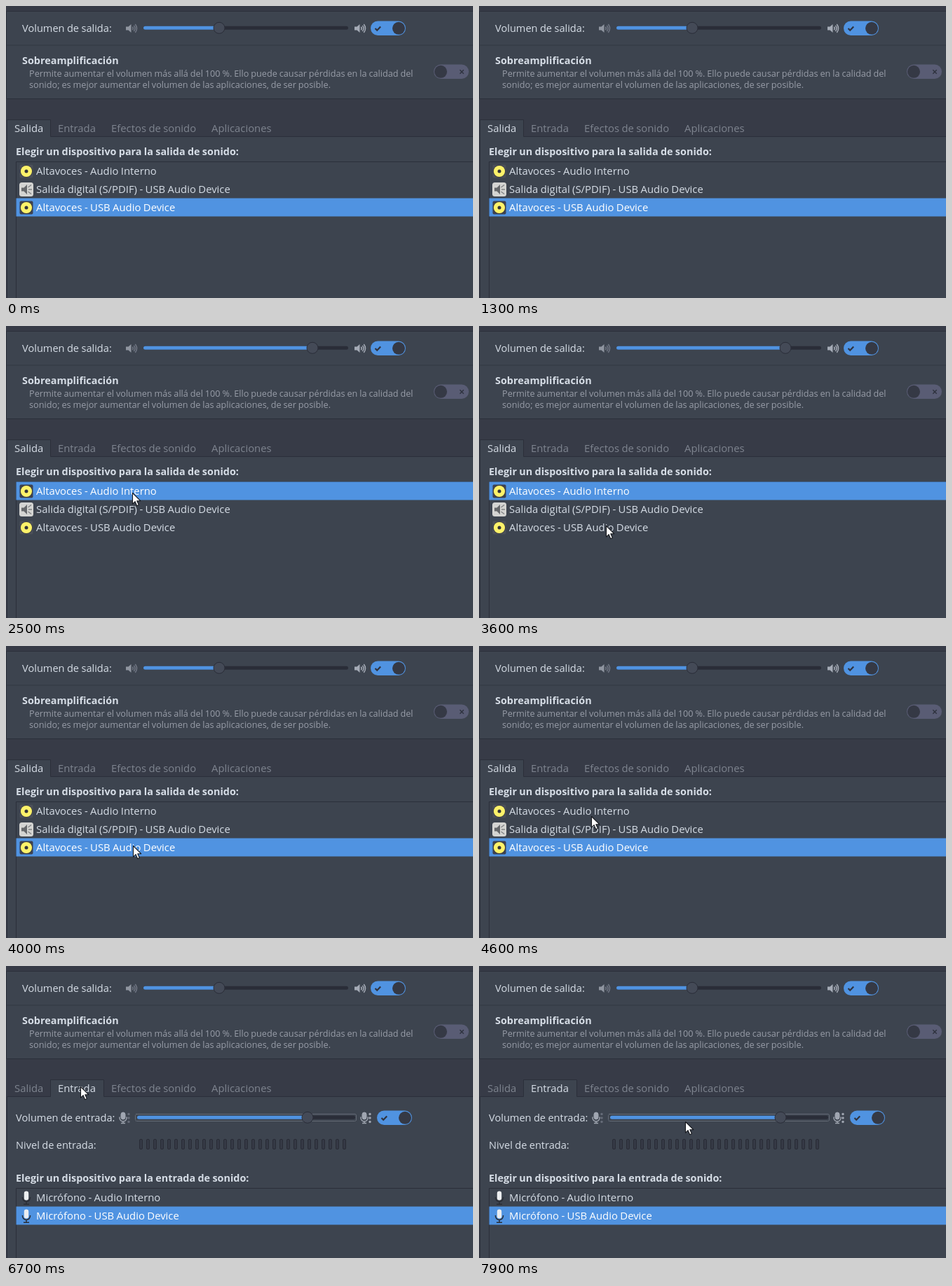
An HTML page for the animation above (8 s loop, 666 by 417 pixels).

```html
<!DOCTYPE html>
<html lang="es">
<head>
<meta charset="utf-8">
<title>Sonido</title>
<style>
  html, body { margin: 0; width: 100%; height: 100%; overflow: hidden; background: #373b47; }
  svg { display: block; width: 666px; height: 417px; }
  text { font: 14.85px "Open Sans", "Noto Sans", sans-serif; word-spacing: -.03em; fill: #d6dde6; white-space: pre; }
  .label { font-size: 14.6px; }
  .head { font-size: 14.4px; font-weight: 700; }
  .note { font-size: 12.7px; fill: #989da8; }
  .tab { fill: #7e848f; }
  .tab.hover { fill: #abb2bd; }
  .tab.on { fill: #d6dde6; }
  .row.on text { fill: #fff; }
  .row .bar { fill: none; }
  .row.on .bar { fill: #5093e1; }
  .row .plate { fill: #4b4f59; }
  .row.on .plate { fill: #3d4250; }
  .panel { fill: #3d444f; }
  .edge { fill: none; stroke: #2b2f3a; }
</style>
</head>
<body>
<svg id="stage" viewBox="0 0 666 417" xmlns="http://www.w3.org/2000/svg">
  <defs>
    <path id="cone" d="M0 5.5h3.5L7.5 2v12L3.5 10.5H0z" />
    <g id="waves" fill="none" stroke-width="1.5">
      <path d="M9.4 5.8q1.8 2.2 0 4.4" />
      <path d="M11.4 3.9q3.2 4.1 0 8.2" />
      <path d="M13.3 2q4.5 6 0 12" />
    </g>
    <g id="mic">
      <rect x="3" y="0" width="6" height="10" rx="3" />
      <path d="M1 6.5v1.5a5 5 0 0 0 10 0V6.5M6 13v2.5M3 15.5h6" fill="none" stroke-width="1.4" />
    </g>
    <g id="dots"><circle cx="14" cy="2.5" r="1.7" /><circle cx="14" cy="8" r="1.7" /><circle cx="14" cy="13.5" r="1.7" /></g>
  </defs>
  <path class="panel" d="M0 7h666v126H0z" />
  <path class="edge" d="M666 7.5H.5V132.5H666" />
  <path class="edge" d="M1 56H666" opacity=".6" />
  <path class="panel" d="M1 186h665v231H1z" />
  <g id="top"></g>
  <g id="tabs"></g>
  <g id="output"></g>
  <g id="input"></g>
  <path id="cursor" d="M.5 .5v15.6l3.6-3.4 2.6 6 2.7-1.2-2.6-5.8h4.9z"
        fill="#fff" stroke="#15171c" stroke-width="1.1" stroke-linejoin="round" />
</svg>
<script>
const LOOP = 8000;
const byId = id => document.getElementById(id);

const label = (x, y, str, cls = "") => `<text x="${x}" y="${y}" class="${cls}">${str}</text>`;

const slider = (id, x0, x1, y, value) => `
  <rect x="${x0}" y="${y - 2.5}" width="${x1 - x0}" height="5" rx="2.5" fill="#2a2d38"/>
  <rect id="${id}Fill" x="${x0}" y="${y - 2.5}" width="${value - x0}" height="5" rx="2.5" fill="#5093e1"/>
  <circle id="${id}Knob" cx="${value}" cy="${y}" r="8" fill="#444a57" stroke="#2a2d38"/>`;

const toggle = (x, y, on) => `
  <g transform="translate(${x} ${y})">
    <rect y="-.5" width="50" height="20.5" rx="10.2" fill="${on ? "#5093e1" : "#595c74"}"/>
    <circle cx="${on ? 40 : 10}" cy="9.8" r="9" fill="#353945"/>
    <path d="${on ? "M6.5 10l2.7 2.7 5-5.2" : "M37.3 7.3l5.4 5.4m0-5.4l-5.4 5.4"}" fill="none"
      stroke="#2f333f" stroke-width="${on ? 2.2 : 1.5}"/>
  </g>`;

const volumeIcon = (x, y, cone, waves) => `
  <g transform="translate(${x} ${y})"><use href="#cone" fill="${cone}"/><use href="#waves" stroke="${waves}"/></g>`;

const micIcon = (x, y, dots) => `
  <g transform="translate(${x} ${y})"><use href="#mic" fill="#a0a6b1" stroke="#a0a6b1"/><use href="#dots" fill="${dots}"/></g>`;

const deviceIcon = {
  speaker: y => `<rect class="plate" x="19.5" y="${y - 9.5}" width="19" height="19" rx="2"/>
    <circle cx="29" cy="${y}" r="9" fill="#3a3b40"/>
    <circle cx="29" cy="${y}" r="8.1" fill="#fdf26a"/>
    <circle cx="29" cy="${y}" r="2.5" fill="#34353b"/>`,
  digital: y => `<rect x="19" y="${y - 10}" width="20" height="20" rx="3.5" fill="#d4d4d2"/>
    <path d="M22 ${y - 2.5}h3.5l4.5-4.5v14l-4.5-4.5h-3.5z" fill="#66686b"/>
    <path d="M31.5 ${y - 3}l4.5-3.5M32 ${y}h5M31.5 ${y + 3}l4.5 3.5" stroke="#808284" stroke-width="1.3"/>`,
  mic: y => `<path d="M23.5 ${y - 1}v1a5.5 5.5 0 0 0 11 0v-1M29 ${y + 6}v3M25 ${y + 9.3}h8"
      fill="none" stroke="#2b2e35" stroke-width="1.5"/>
    <rect x="25.8" y="${y - 9.5}" width="6.4" height="13" rx="3.2" fill="#eceef0"/>`
};

const row = (top, icon, name) => `
  <g class="row"><rect class="bar" x="14.5" y="${top - .5}" width="652" height="26"/>
  ${deviceIcon[icon](top + 13)}${label(43, top + 18, name)}</g>`;

const listEdge = top => `<path class="edge" d="M666 ${top - .5}H14.5V417"/>`;

byId("top").innerHTML =
  label(23, 37, "Volumen de salida:", "label") +
  volumeIcon(171, 24, "#8f95a0", "#717784") + slider("out", 196, 488, 31.3, 304) +
  volumeIcon(497, 24, "#a5abb6", "#a5abb6") + toggle(520, 22, true) +
  label(23, 83, "Sobreamplificación", "head") +
  label(33, 101, "Permite aumentar el volumen más allá del 100 %. Ello puede causar pérdidas en la calidad del", "note") +
  label(33, 117, "sonido; es mejor aumentar el volumen de las aplicaciones, de ser posible.", "note") +
  toggle(610, 84, false);

byId("tabs").innerHTML =
  `<path id="hoverTab" d="M64 162.5H139.5V186" class="edge" style="fill:#3a3f4b"/>
   <path id="tabFill" class="panel"/><path id="tabEdge" class="edge"/>` +
  [[12, "Salida"], [74, "Entrada"], [150, "Efectos de sonido"], [293, "Aplicaciones"]]
    .map(([x, name]) => label(x, 180, name, "tab")).join("");

byId("output").innerHTML =
  label(14, 213, "Elegir un dispositivo para la salida de sonido:", "head") + listEdge(223) +
  row(223, "speaker", "Altavoces - Audio Interno") +
  row(249, "digital", "Salida digital (S/PDIF) - USB Audio Device") +
  row(275, "speaker", "Altavoces - USB Audio Device");

const meter = Array.from({ length: 30 }, (_, i) =>
  `<rect x="${190.5 + 10 * i}" y="247.5" width="4" height="14" rx="1.5" fill="#353945" stroke="#292c36"/>`).join("");

byId("input").innerHTML =
  label(14, 222, "Volumen de entrada:", "label") + micIcon(161, 209, "#666c78") +
  `<rect x="184.5" y="211.5" width="315" height="10" rx="2" fill="none" stroke="#8b919c" stroke-dasharray="1 1"/>` +
  slider("in", 187, 498, 216.3, 430) + micIcon(505, 209, "#a0a6b1") + toggle(529, 207, true) +
  label(14, 261, "Nivel de entrada:", "label") + meter +
  label(14, 308, "Elegir un dispositivo para la entrada de sonido:", "head") + listEdge(318) +
  row(318, "mic", "Micrófono - Audio Interno") +
  row(344, "mic", "Micrófono - USB Audio Device");

const tabs = [...document.querySelectorAll(".tab")];
const outRows = [...byId("output").querySelectorAll(".row")];
byId("input").querySelectorAll(".row")[1].classList.add("on");

// Pointer tip: [ms, x, y]
const path = [
  [1600, 652, 341], [1700, 500, 316], [1800, 325, 278], [1900, 212, 247], [2000, 180, 238],
  [3200, 177, 297], [3400, 178, 293], [3500, 180, 288], [3600, 181, 285],
  [4500, 176, 272], [4600, 160, 243], [4700, 138, 212], [4800, 120, 189], [4900, 109, 176], [5000, 106, 172],
  [7500, 162, 194], [7600, 258, 225], [7700, 298, 221], [7900, 294, 222]
];

const show = (el, on) => { el.style.display = on ? "" : "none"; };

function draw(t) {
  const step = path.filter(p => p[0] <= t).pop();
  const cursor = byId("cursor");
  show(cursor, step);
  if (step) cursor.setAttribute("transform", `translate(${step[1]} ${step[2]})`);

  const internal = t >= 2500 && t < 4000;
  const input = t >= 6700;
  const hover = t >= 4900 && !input;
  const volume = internal ? 437 : 304;
  byId("outFill").setAttribute("width", volume - 196);
  byId("outKnob").setAttribute("cx", volume);
  outRows.forEach((r, i) => r.classList.toggle("on", i === (internal ? 0 : 2)));

  tabs.forEach((el, i) => {
    el.classList.toggle("on", i === +input);
    el.classList.toggle("hover", hover && i === 1);
  });
  const [x0, x1] = input ? [63.5, 139.5] : [1.5, 63.5];
  byId("tabFill").setAttribute("d", `M${x0} 162.5H${x1}V188H${x0}z`);
  byId("tabEdge").setAttribute("d", `M1.5 417V186.5H${x0}V162.5H${x1}V186.5H666`);
  show(byId("hoverTab"), hover);
  show(byId("output"), !input);
  show(byId("input"), input);
}

const start = performance.now();
function tick() {
  draw((performance.now() - start) % LOOP);
  requestAnimationFrame(tick);
}
tick();
</script>
</body>
</html>
```
